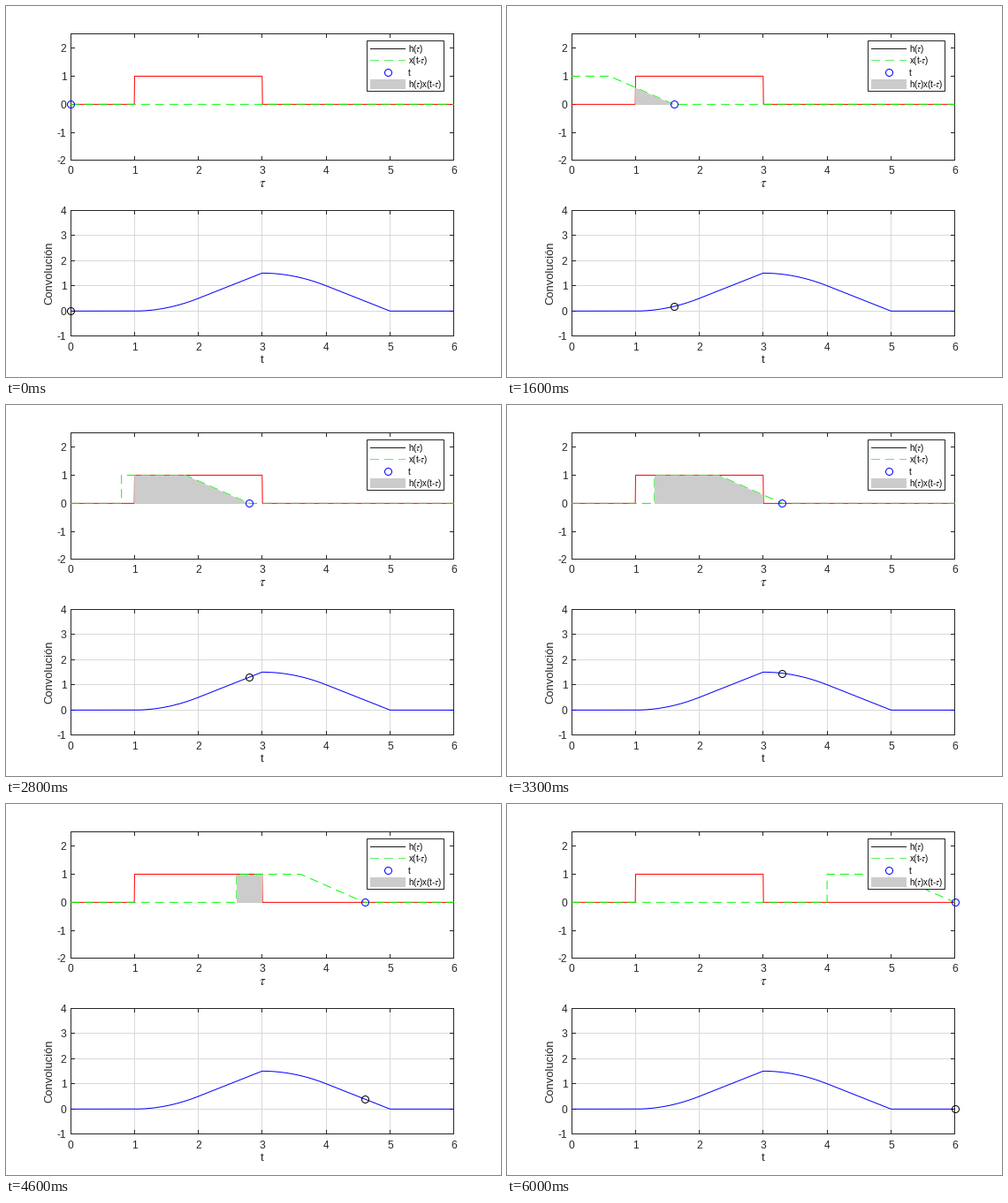
Animation of 560 by 420 pixels, one loop 6.1 s. Source, as a matplotlib script:

```python
import matplotlib.pyplot as plt
import numpy as np
from matplotlib.animation import FuncAnimation
from matplotlib.patches import Polygon, Rectangle

W, H = 560, 420
PX = 0.72  # points per pixel at 100 dpi
INK = "#262626"
RED, GREEN, BLUE, GREY = "#ff0000", "#00ff00", "#0000ff", "#cccccc"
DASH = (0, (10, 6))
LEFT, RIGHT = 73.5, 506.5
TAU = r"$\tau$"

plt.rcParams.update({
    "font.family": "Liberation Sans",
    "mathtext.fontset": "stix",
    "toolbar": "None",
})

fig = plt.figure(figsize=(W / 100, H / 100), dpi=100, facecolor="white")
ax = fig.add_axes([0, 0, 1, 1])
ax.set_xlim(0, W)
ax.set_ylim(H, 0)
ax.axis("off")


def px(tau):
    return 72.8 + 72.33 * np.asarray(tau, float)


def top_y(v):
    return 111.35 - 31.9 * np.asarray(v, float)


def low_y(v):
    return 345.35 - 28.65 * np.asarray(v, float)


def crisp(v):
    """Centre of the pixel nearest to v."""
    return np.floor(v) + 0.5


def line(x, y, color, z=2, **kw):
    return ax.plot(x, y, color=color, lw=PX, zorder=z, snap=False,
                   solid_capstyle="butt", dash_capstyle="butt",
                   solid_joinstyle="miter", **kw)[0]


def ring(color, x=0, y=0, z=5):
    return ax.plot([x], [y], "o", ms=8 * PX, mfc="none", mec=color,
                   mew=PX, zorder=z)[0]


def label(x, y, s, size=12, color=INK, ha="center", **kw):
    return ax.text(x, y, s, fontsize=size * PX, color=color, ha=ha,
                   va=kw.pop("va", "baseline"), zorder=10, **kw)


def frame(top, bottom, y_of, values, grid=False):
    """Boxed axes with inward ticks on all four sides."""
    for k in range(7):
        x = min(max(crisp(px(k)), LEFT), RIGHT)
        if grid and 0 < k < 6:
            line([x, x], [top, bottom], "#d9d9d9", 1)
        line([x, x], [bottom, bottom - 4.5], INK)
        line([x, x], [top, top + 4.5], INK)
        label(px(k), bottom + 16, str(k))
    for v in values:
        y = min(max(crisp(y_of(v)), top), bottom)
        if grid and top < y < bottom:
            line([LEFT, RIGHT], [y, y], "#d9d9d9", 1)
        line([LEFT, LEFT + 4.5], [y, y], INK)
        line([RIGHT, RIGHT - 4.5], [y, y], INK)
        label(68.5, y + 4.2, str(v), ha="right")
    ax.add_patch(Rectangle((LEFT, top), RIGHT - LEFT, bottom - top, fill=False,
                           ec=INK, lw=PX, zorder=2, snap=False))


def legend():
    ax.add_patch(Rectangle((408.5, 39.5), 87, 57, fc="white", ec=INK, lw=PX,
                           zorder=8, snap=False))
    line([412, 452], [48.5, 48.5], "#1a1a1a", 9)
    line([412, 452], [61.5, 61.5], "#60f060", 9, ls=DASH)
    ring(BLUE, 432, 75, 9)
    ax.add_patch(Rectangle((412, 83), 40, 11, fc=GREY, lw=0, zorder=9))
    names = [f"h({TAU})", f"x(t-{TAU})", "t", f"h({TAU})x(t-{TAU})"]
    for k, name in enumerate(names):
        label(455, 52 + 13.4 * k, name, 9.7, "black", "left")


def area(u):
    """Integral of the pulse from 0 to u."""
    u = np.clip(u, 0, 2)
    return np.where(u < 1, u * u / 2, u - 0.5)


def convolution(t):
    return area(t - 1) - area(t - 3)


def flipped_pulse(t):
    """Corner points of x(t - tau) on 0..6."""
    if t >= 2:
        pts = [(0, 0), (t - 2, 0), (t - 2, 1)]
    else:
        pts = [(0, min(t, 1))]
    if t > 1:
        pts.append((t - 1, 1))
    pts += [(t, 0), (6, 0)]
    return np.array(pts, float).T


def overlap(t):
    """Outline of the product h(tau) x(t - tau), in pixels."""
    lo, hi = max(1, t - 2), min(3, t)
    if hi <= lo:
        return np.zeros((3, 2))
    tau = np.linspace(lo, hi, 120)
    tops = np.column_stack([px(tau), top_y(np.clip(t - tau, 0, 1)) + 0.3])
    return np.vstack([[px(lo), 112], tops, [px(hi), 112]])


frame(31.5, 174.5, top_y, range(-2, 3))
frame(231.5, 373.5, low_y, range(-1, 5), grid=True)
label(290, 205, TAU, 15)
label(290, 404, "t", 13)
label(49, 302.5, "Convolución", 13, rotation=90, va="center")
legend()

line(px([0, 1, 1.005, 3, 3.005, 6]), top_y([0, 0, 1, 1, 0, 0]), RED)
times = np.linspace(0, 6, 601)
line(px(times), low_y(convolution(times)), BLUE)

pulse = line([], [], GREEN, 3, ls=DASH)
shade = ax.add_patch(Polygon(np.zeros((3, 2)), fc=GREY, lw=0, zorder=4))
cursor = ring(BLUE)
tracker = ring("black")
moving = [pulse, shade, cursor, tracker]


def update(i):
    t = i / 10
    tau, v = flipped_pulse(t)
    pulse.set_data(px(tau), top_y(v))
    shade.set_xy(overlap(t))
    cursor.set_data([px(t)], [top_y(0)])
    tracker.set_data([px(t)], [low_y(convolution(t))])
    return moving


anim = FuncAnimation(fig, update, frames=61, interval=100,
                     init_func=lambda: update(0), repeat=True)
plt.show()
```
